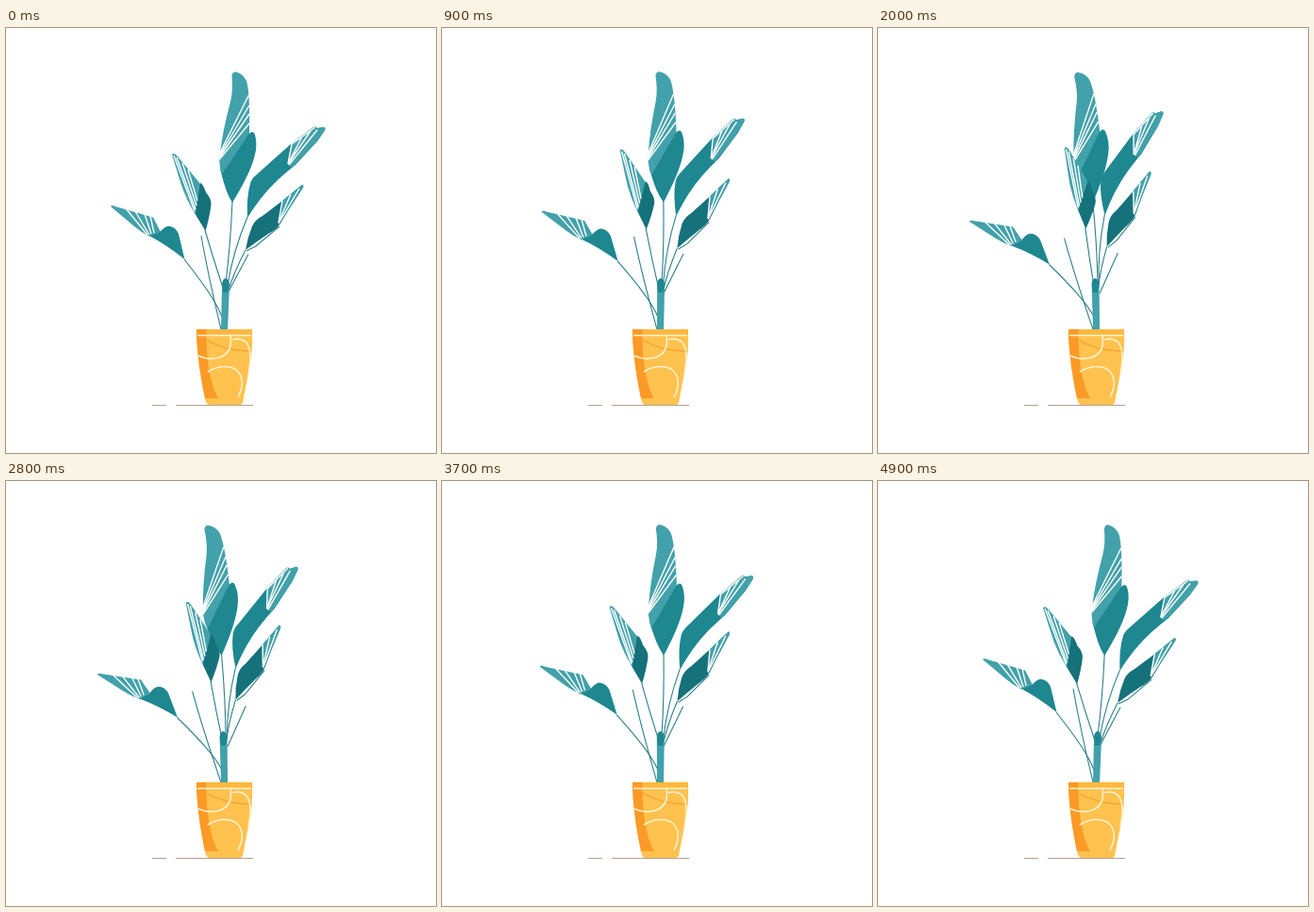
Recreate the animation shown at these times as an HTML page. Size 456x450 px, loop 5000 ms.

```html
<!DOCTYPE html>
<html lang="en">
<head>
<meta charset="utf-8">
<title>Swaying plant</title>
<style>
html, body { margin: 0; width: 100%; height: 100%; overflow: hidden; background: #fff; }
svg { display: block; width: 100vw; height: 100vh; }
.stem, .rib, .line { fill: none; }
.stem { stroke: #2c7f87; stroke-width: 1.1; }
.rib { stroke: #fff; stroke-width: 1.4; }
.mid { fill: #1e8790; }
.light { fill: #42a1aa; }
.dark { fill: #15717a; }
</style>
</head>
<body>
<svg viewBox="0 0 456 450">
  <path class="line" d="M155 399.5H170M180 399.5H262" stroke="#b3a08f"/>

  <g id="twigLeft"><path class="stem" d="M207 220Q214 260 228 319"/></g>
  <g id="twigRight"><path class="stem" d="M257 239.5L235 281"/></g>

  <g id="low">
    <path class="stem" d="M189 245Q205 265 215 280T229 306"/>
    <path class="mid" d="M152 220L164 215Q170 209 174 210Q180 211 183 218L189.500 245Q171 230 152 220Z"/>
    <path class="light" d="M111 189Q112 187 116 189L156 200.500L164 216L152 220.500Q143 216 136 210Z"/>
    <path class="rib" d="M127 191L150 219M137 194L152 219M147 197L154 218M153 199L157 217"/>
  </g>

  <g id="right">
    <path class="stem" d="M256 200Q241 236 235 272"/>
    <path class="mid" d="M256 201Q255 178 259 165Q260 160 266 155L303 122L326 105Q328 103 330 106L337 105Q340 106 337 110L330 120L307 145Q299 151 288 161Q270 178 256 201Z"/>
    <path class="light" d="M328 105L330 106L337 105Q340 106 337 110L330 120L303 148L299 144L303 123Z"/>
    <path class="rib" d="M328 105L303 123L299 144L314 115M299 144L323 109M300 145L330 108"/>
  </g>

  <g id="small">
    <path class="stem" d="M254 235Q242 258 235 280M290 210L265 231L255 236"/>
    <path class="dark" d="M254 235Q256 222 261 210Q264 203 272 199L293 183L314 166Q316 166 315 169L300 192L291 207Q287 213 278 218Q266 226 254 235Z"/>
    <path class="light" d="M293 183L314 166Q316 166 315 169L300 192L289 208Z"/>
    <path class="rib" d="M293 183L289 206L302 176M289 207L311 170"/>
  </g>

  <g id="top">
    <path class="stem" d="M240 184Q238 230 233 270"/>
    <path class="light" d="M239.500 51Q240 46 244 46.500Q251 48 255 56Q259 69 258 114L234 168Q224 151 227 132Q230 108 238 78Q241 66 239.500 51Z"/>
    <path class="mid" d="M229 155L257 113Q262 107 264 113Q267 124 263.500 136Q259 154 240 185Q232 172 229 155Z"/>
    <path class="rib" d="M257.500 71L226.500 133M258 82L226.500 135M258 91L226.500 137M258 101L226.500 139"/>
  </g>

  <g id="left">
    <path class="stem" d="M211 214Q220 245 230 275"/>
    <path class="light" d="M176 134Q178 131 182 136L206 165L207 207Q190 182 184 160Z"/>
    <path class="dark" d="M206 164Q209 165 212 174Q218 181 217.500 187Q216 200 211.500 215L201 197Z"/>
    <path class="rib" d="M178 135L200 194M181 137L201 192M187 143L202 188M193 150L203 183"/>
  </g>

  <g id="trunk">
    <path class="light" d="M229 273H237L235 321H228Z"/>
    <path class="mid" d="M229 271Q230 265 233 265Q237 266 237 272L235 280H230Z"/>
  </g>

  <g>
    <path d="M202 319H261Q262 345 257.500 363L251 397Q250 399 248 399H215Q212 398 211 392Q202 349 202 319Z" fill="#ffc24f"/>
    <path d="M202 319H261V325H202Z" fill="#fdb840"/>
    <path d="M202 319H212.500Q212 350 217 370Q220 384 225 392H211Q202 349 202 319Z" fill="#fb9a26"/>
    <path class="line" d="M211 329Q230 342 260 342" stroke="#f6a22b" stroke-width="1.3"/>
    <path class="line" d="M203 325.500H260M238 326Q241 344 226 349Q214 352 204 347M214 364Q229 355 243 361Q256 371 246 391M240 330Q265 324 257 367" stroke="#fff3cf" stroke-width="1.5"/>
  </g>
</svg>
<script>
const LOOP = 5000, STEP = 100;

// id: [pivot x, pivot y, swing in degrees, time of the far end in ms]
const parts = {
  low: [228, 306, 3.95, 2400],
  left: [231, 270, -5.1, 1920],
  top: [232, 270, 4.3, 2290],
  right: [236, 276, 6.2, 2100],
  small: [231, 290, 6, 2300],
  twigLeft: [229, 319, 2.95, 2400],
  twigRight: [236, 280, 2, 2400],
  trunk: [231.5, 319, 1.6, 2400]
};

const wave = ms => Math.cos(2 * Math.PI * ms / LOOP);

function draw(now) {
  const t = Math.floor(now % LOOP / STEP) * STEP;
  for (const [id, [x, y, swing, peak]] of Object.entries(parts)) {
    const angle = swing * (wave(peak) - wave(t - peak));
    document.getElementById(id).setAttribute('transform', `rotate(${angle} ${x} ${y})`);
  }
}

const start = performance.now();
function tick() {
  draw(performance.now() - start);
  requestAnimationFrame(tick);
}
tick();
</script>
</body>
</html>
```
